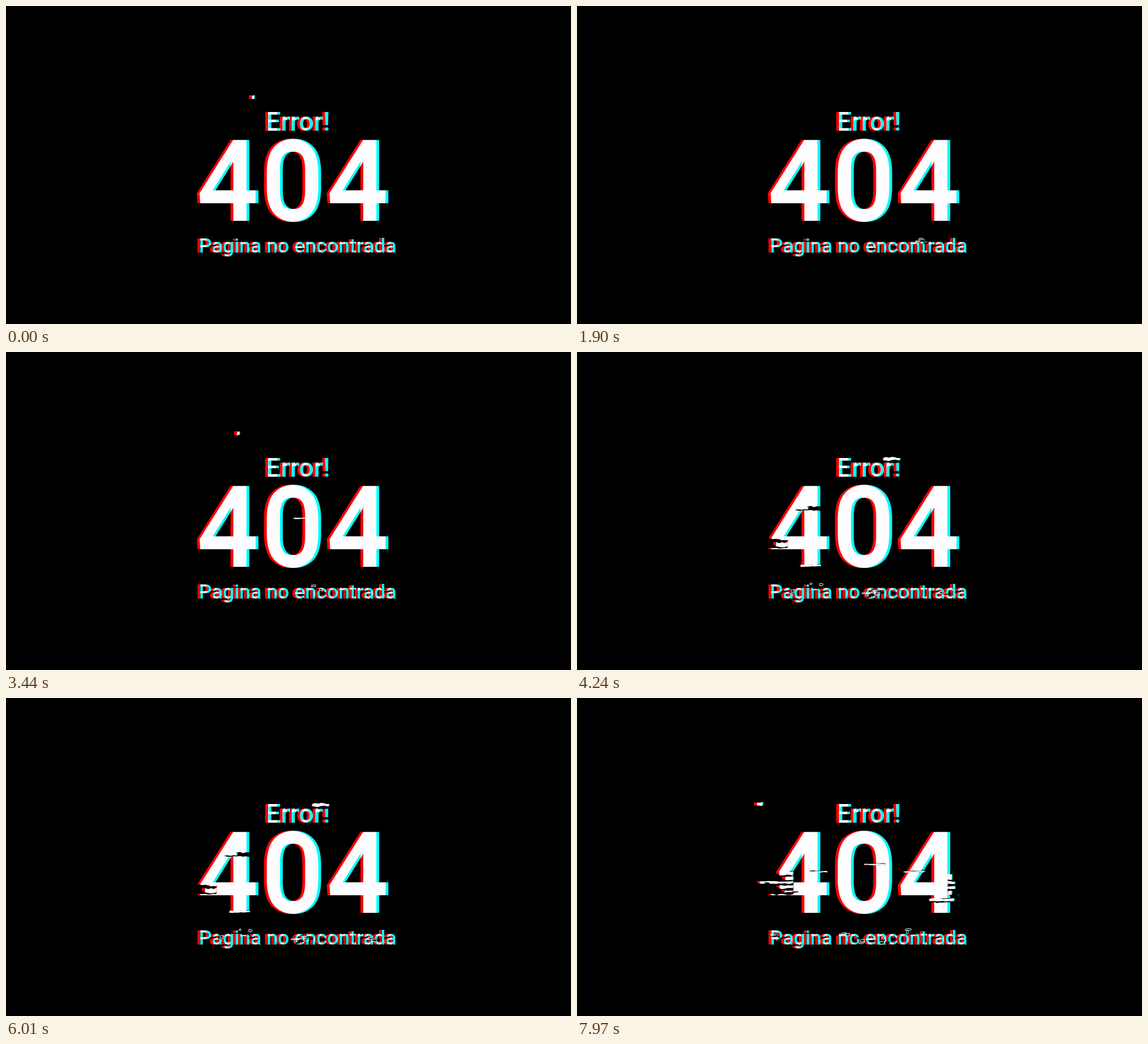
An HTML page that plays this animation: 998 by 561 pixels, repeating every 8 s.

```html
<!DOCTYPE html>
<html lang="es">
<head>
<meta charset="utf-8">
<title>Error 404</title>
<style>
  html, body { margin: 0; width: 100%; height: 100%; overflow: hidden; background: #000; }
  svg { display: block; width: 100vw; height: 100vh; isolation: isolate; }
  text { font-family: Roboto, sans-serif; font-weight: 500; text-anchor: middle; stroke: none; }
  .big { font-weight: 700; }
  .red { fill: #fd0000; stroke: #fd0000; }
  .cyan { fill: #00fcff; stroke: #00fcff; mix-blend-mode: screen; }
  .bits { stroke: none; }
  .holes, .cuts { fill: #000; stroke: none; }
  .lines { fill: none; stroke-width: 1; }
</style>
</head>
<body>
<svg viewBox="0 0 998 561">
  <defs>
    <g id="copy">
      <text x="513.5" y="219.5" font-size="46.4">Error!</text>
      <text class="big" x="506.1" y="379" font-size="200">404</text>
      <text x="512.8" y="435" font-size="35.7">Pagina no encontrada</text>
    </g>
  </defs>
  <rect width="998" height="561"/>
  <g class="red"></g>
  <g class="cyan"></g>
</svg>
<script>
const LOOP = 8000, STEP = 33.35, CYCLE = 53;
const KINDS = ['holes', 'bits', 'cuts', 'lines'];

// Torn places: x, y, width, height and the side (-1 left, 1 right) they smear to.
const EARLY = {
  tears: [[336, 328, 36, 20, -1], [387, 271, 52, 10, 1], [395, 374, 36, 7, 1], [541, 185, 32, 12, 1]],
  slivers: []
};
const LATE = {
  tears: [[334, 305, 48, 43, -1], [655, 310, 24, 39, 1], [622, 353, 38, 9, 1]],
  slivers: [[412, 304], [577, 304], [508, 291]]
};

function random(seed) {
  let s = (seed + 1) * 2654435761 >>> 0;
  return () => {
    s = s + 0x6D2B79F5 >>> 0;
    let v = Math.imul(s ^ s >>> 15, s | 1);
    v ^= v + Math.imul(v ^ v >>> 7, v | 61);
    return ((v ^ v >>> 14) >>> 0) / 4294967296;
  };
}

// Box outline with rough top and bottom edges.
function ragged(x, y, w, h, rnd) {
  const n = Math.max(2, Math.round(w / 5));
  const rough = Math.min(3, h * 0.3);
  const pts = [];
  for (let i = 0; i <= n; i++) pts.push([x + w * i / n, y + rnd() * rough]);
  for (let i = n; i >= 0; i--) pts.push([x + w * (i - rnd() * 0.3) / n, y + h - rnd() * rough]);
  return 'M' + pts.map(p => p.map(v => v.toFixed(1)).join(' ')).join('L') + 'Z';
}

// Cut a box out and refill it with rows smeared sideways.
function tear([x, y, w, h, side], rnd, out) {
  out.holes += ragged(x, y, w, h, rnd);
  for (let row = 0; row < h - 3;) {
    const rh = Math.min(h - row, 5 + rnd() * 7);
    const rw = w * (0.3 + 1.1 * rnd() ** 2);
    const left = side < 0 ? x + w - rw : x;
    out.bits += ragged(left, y + row, rw, rh, rnd);
    if (side < 0) out.red += ragged(left - 4, y + row, 6, rh * 0.7, rnd);
    if (rnd() < 0.4) out.cuts += ragged(left + rw * rnd(), y + row + rh - 3, 6 + rnd() * 8, 3, rnd);
    row += rh + rnd() * 2;
  }
}

function sliver([x, y], rnd, out) {
  const w = 16 + rnd() * 24;
  out.holes += ragged(x, y, w, 4, rnd);
  out.bits += ragged(x, y + 1, w, 3, rnd);
}

// Clusters of small cuts and outlines along the caption.
function crumble(count, rnd, out) {
  for (let i = 0; i < count; i++) {
    const cx = 338 + rnd() * 300, cy = 404 + rnd() * 18;
    for (let k = 0; k < 6; k++) {
      const kind = k % 3 == 2 ? 'lines' : 'cuts';
      out[kind] += ragged(cx + rnd() * 18, cy + rnd() * 10, 3 + rnd() * 7, 2 + rnd() * 5, rnd);
    }
  }
}

function shard(x, y, w, h, rnd, out) {
  out.bits += ragged(x, y, w, h, rnd);
  out.red += ragged(x - 4, y, 6, h, rnd);
}

function glitch(p) {
  const out = { holes: '', bits: '', cuts: '', lines: '', red: '' };
  const strength = p < 2 ? 0 : Math.sin(Math.PI * p / CYCLE);
  const set = p < 24 ? EARLY : LATE;
  const slow = random(Math.floor(p / 3)), fast = random(p + 100);
  for (const box of set.tears) if (fast() < strength * 1.1) tear(box, slow, out);
  for (const point of set.slivers) if (fast() < strength * 1.1) sliver(point, slow, out);
  crumble(Math.round(strength * (3 + fast() * 3)), fast, out);
  if (p < 1 || p > 43) shard(434 + 100 * Math.sin(p), 156 - 34 * Math.abs(Math.sin(p * 2)), 5, 9, fast, out);
  if (strength > 0.97) shard(300 + fast() * 30, 180 + fast() * 20, 8 + fast() * 12, 8, fast, out);
  return out;
}

function layer(name, side) {
  const g = document.querySelector('.' + name);
  const make = (tag, attrs) => {
    const el = g.appendChild(document.createElementNS('http://www.w3.org/2000/svg', tag));
    for (const k in attrs) el.setAttribute(k, attrs[k]);
    return el;
  };
  make('use', { href: '#copy', transform: `translate(${side * 2.5} 0)` });
  const paths = {};
  for (const kind of KINDS) paths[kind] = make('path', { class: kind, transform: `translate(${side * 0.7} 0)` });
  return paths;
}

const red = layer('red', -1), cyan = layer('cyan', 1);
let shown = -1;

function draw(t) {
  const phase = Math.floor(t % LOOP / STEP + 0.2) % CYCLE;
  if (phase == shown) return;
  shown = phase;
  const shapes = glitch(phase);
  for (const kind of KINDS) {
    red[kind].setAttribute('d', shapes[kind] + (kind == 'bits' ? shapes.red : ''));
    cyan[kind].setAttribute('d', shapes[kind]);
  }
}

const start = performance.now();
function tick() {
  draw(performance.now() - start);
  requestAnimationFrame(tick);
}
tick();
</script>
</body>
</html>
```
